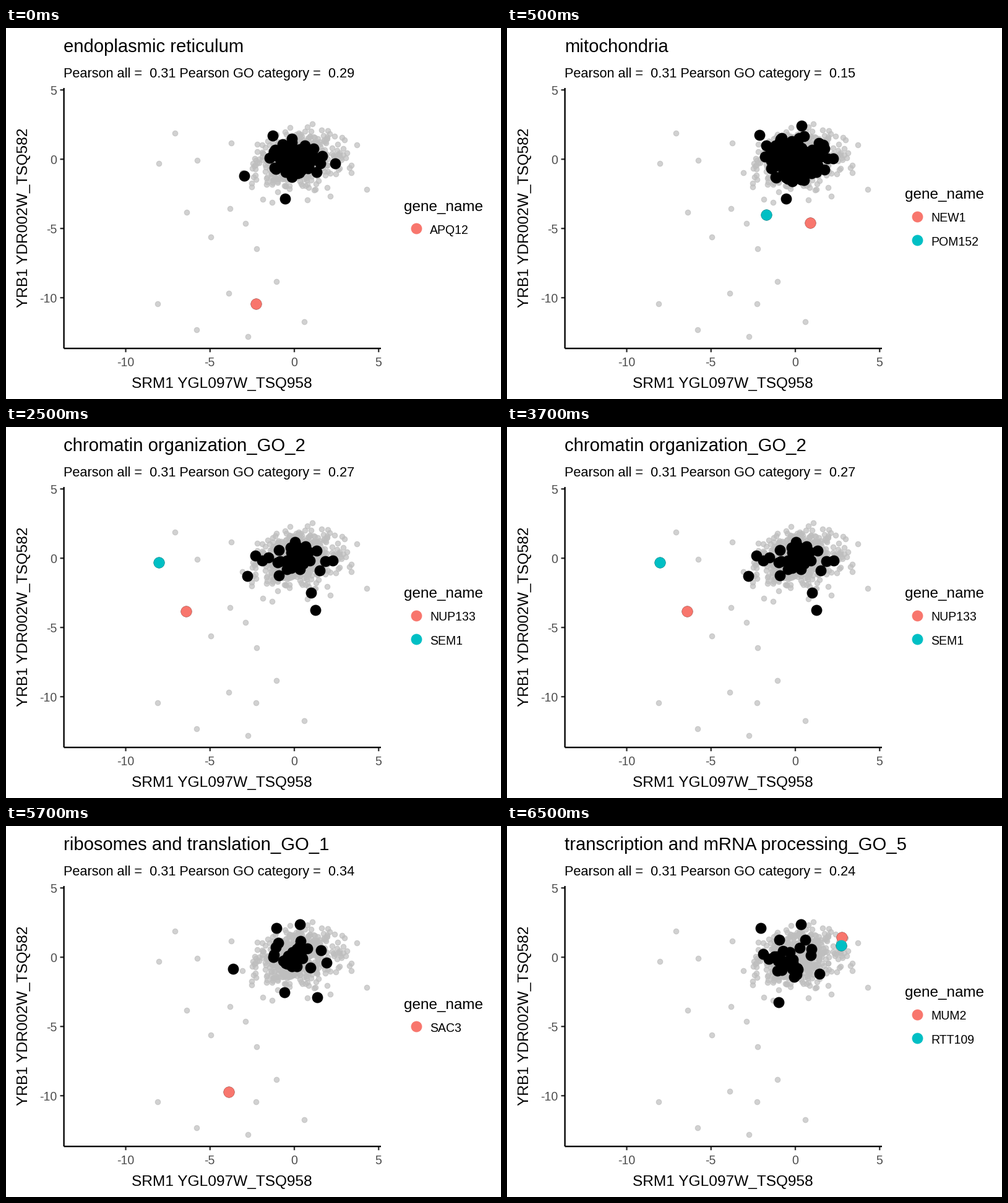
A matplotlib script that plays this animation: 800 by 600 pixels, repeating every 8 s.

```python
import numpy as np
import matplotlib.pyplot as plt
from matplotlib.animation import FuncAnimation

DPI = 80
STEP = 500  # ms per frame
SCENE_FRAMES = 4
FIRST_FRAMES = 1
RED, TEAL, GREY = "#F8766D", "#00BFC4", "#BEBEBE"

plt.rcParams["font.family"] = "Liberation Sans"
fig = plt.figure(figsize=(10, 7.5), dpi=DPI, facecolor="white")
ax = fig.add_axes([0, 0, 1, 1])
ax.set(xlim=(0, 800), ylim=(600, 0))
ax.axis("off")


def stage(points):
    """Convert data values to stage pixels."""
    return np.array([466, 212.2]) + np.reshape(points, (-1, 2)) * [27.25, -22.4]


def label(x, y, text="", size=22, color="black", **kw):
    return ax.text(x, y, text, fontsize=size, color=color, va="baseline", **kw)


def dots(points, radius, color, z, width=0.75, alpha=1):
    x, y = np.reshape(points, (-1, 2)).T
    return ax.scatter(x, y, s=(2 * radius * 72 / DPI) ** 2, facecolor=color,
                      edgecolor=color, linewidth=width, alpha=alpha, zorder=z)


def big_dots(color, z):
    return dots([], 8.5, color, z)


def background_cloud(count=640):
    """Correlated heavy-tailed scatter, cut off sooner above than below."""
    rng = np.random.default_rng(5)
    tail = np.sqrt(6 / rng.chisquare(6, count))
    x = 1.0 * tail * rng.standard_normal(count)
    y = 0.82 * tail * rng.standard_normal(count) + 0.18 * x
    limit = np.where(y > 0, 2.6, 4.4)
    keep = (x / 3.4) ** 2 + (y / limit) ** 2 < 1
    return np.column_stack([x + 0.15, y + 0.1])[keep]


def category_cloud(seed, count, center, spread):
    rng = np.random.default_rng(seed)
    points = rng.standard_normal((3 * count, 2))
    points = points[np.hypot(*points.T) < 2.2][:count]
    return center + points * spread


far_points = [
    (-7.1, 1.9), (-8.05, -0.3), (-5.75, -0.1), (-6.4, -3.85), (-4.95, -5.6),
    (-2.9, -4.65), (-2.25, -6.45), (-8.1, -10.45), (-5.8, -12.3),
    (-2.75, -12.8), (-3.9, -9.7), (-2.28, -10.45), (-1.05, -8.85),
    (0.6, -11.75), (4.3, -2.2), (-3.75, 1.15), (-3.8, -3.55), (3.7, 1.05),
]

# title, correlation, cloud (seed, count, center, spread), outer points, genes
scenes = [
    ("endoplasmic reticulum", "0.29", (1, 130, (0.15, 0.1), (0.76, 0.68)),
     [(-2.97, -1.2), (-0.55, -2.85), (2.42, -0.3), (-1.27, 1.7)],
     [("APQ12", (-2.28, -10.45))]),
    ("mitochondria", "0.15", (2, 150, (0, 0.1), (0.92, 0.8)),
     [(0.37, 2.4), (-0.55, -2.85), (2.25, 0.05), (-2.13, 1.75)],
     [("NEW1", (0.88, -4.6)), ("POM152", (-1.73, -4))]),
    ("chromatin organization_GO_2", "0.27", (3, 32, (0, 0), (0.95, 0.75)),
     [(-2.8, -1.28), (1, -2.5), (1.25, -3.75), (2.28, -0.17), (-2.3, 0.2)],
     [("NUP133", (-6.42, -3.85)), ("SEM1", (-8.04, -0.3))]),
    ("ribosomes and translation_GO_1", "0.34", (4, 26, (0.15, 0), (0.85, 0.75)),
     [(-3.63, -0.85), (-0.58, -2.53), (1.36, -2.9), (-1.06, 2.1), (0.33, 2.37)],
     [("SAC3", (-3.89, -9.72))]),
    ("transcription and mRNA processing_GO_5", "0.24",
     (5, 25, (-0.1, 0.05), (0.9, 0.75)),
     [(-2.05, 2.1), (0.33, 2.37), (-1, -3.25), (1.43, -1.2)],
     [("MUM2", (2.77, 1.42)), ("RTT109", (2.73, 0.84))]),
]


def draw_axes():
    style = dict(lw=2.13, solid_capstyle="butt", snap=False, zorder=1)
    left, bottom = 93.6, 518.2
    for value in (-10, -5, 0, 5):
        x, y = stage((value, value))[0]
        ax.plot([x, x], [bottom, bottom + 6.1], color="#333333", **style)
        ax.plot([left - 6.1, left], [y, y], color="#333333", **style)
        label(x - 0.5, 547, str(value), 17.6, "#4D4D4D", ha="center")
        label(82, y + 8, str(value), 17.6, "#4D4D4D", ha="right")
    ax.plot([left, left], [97, bottom], color="black", **style)
    ax.plot([left, 606], [bottom, bottom], color="black", **style)
    label(349, 582, "SRM1 YGL097W_TSQ958", ha="center")
    label(35.5, 307, "YRB1 YDR002W_TSQ582", ha="center", rotation=90,
          rotation_mode="anchor")


draw_axes()
dots(stage(np.vstack([background_cloud(), far_points])), 4.2, GREY, 2,
     width=1.1, alpha=0.7)
title = label(93, 39.3, size=26.3)
subtitle = label(93, 80, size=19.6)
legend_title = label(643, 296, "gene_name", size=21.8)
black = big_dots("black", 3)
marks = [big_dots(color, 4 + i) for i, color in enumerate((RED, TEAL))]
names = [label(685, 0, size=17.6) for _ in marks]


def update(frame):
    scene = (frame - FIRST_FRAMES) // SCENE_FRAMES + 1
    heading, score, cloud, outer, genes = scenes[scene]
    title.set_text(heading)
    subtitle.set_text(f"Pearson all =  0.31 Pearson GO category =  {score}")
    spots = [spot for _, spot in genes]
    black.set_offsets(stage(np.vstack([category_cloud(*cloud), outer, spots])))
    top = 324 - 19.5 * (len(genes) - 1)
    legend_title.set_y(top - 28.3)
    for mark, name in zip(marks, names):
        mark.set_visible(False)
        name.set_visible(False)
    for i, (gene, spot) in enumerate(genes):
        key_y = top + 38.8 * i
        marks[i].set_offsets(np.vstack([stage(spot), (663, key_y)]))
        marks[i].set_visible(True)
        names[i].set(text=gene, y=key_y + 8.7, visible=True)
    return [title, subtitle, legend_title, black, *marks, *names]


anim = FuncAnimation(fig, update, frames=16, interval=STEP, repeat=True,
                     repeat_delay=0, blit=False)
plt.show()
```
